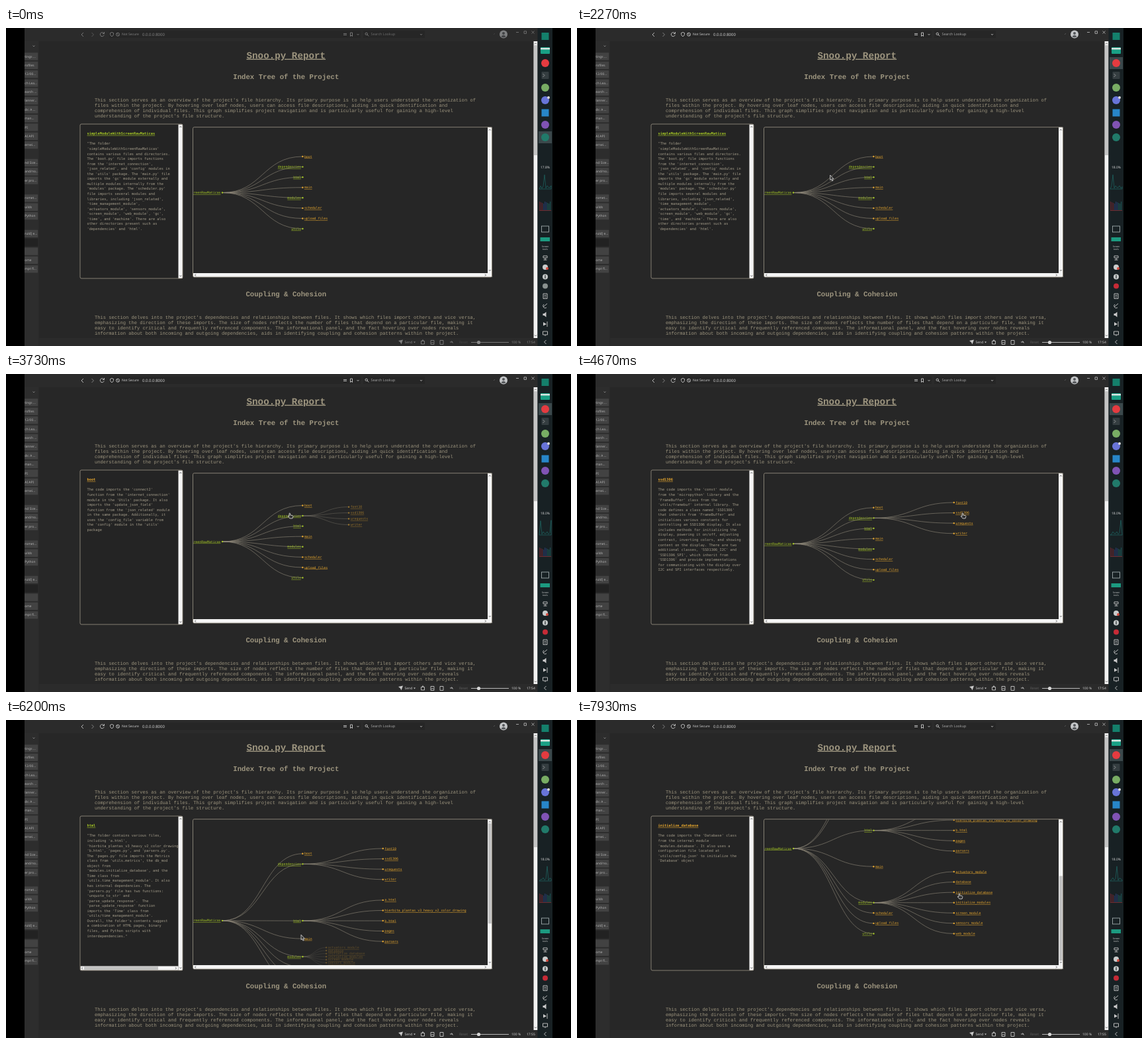
These frames come from a looping animation (854 px wide and 480 px high, 8 s). An HTML page:

```html
<!DOCTYPE html>
<html lang="en">
<head>
<meta charset="utf-8">
<title>Project report</title>
<style>
html, body { margin: 0; width: 100%; height: 100%; overflow: hidden; background: #000; }
svg { display: block; width: 854px; height: 480px; text-rendering: geometricPrecision; }
text { white-space: pre; }
.page { font-family: "Liberation Mono", monospace; fill: #9d957f; }
.code { font-family: "DejaVu Sans Mono", monospace; }
.ui { font-family: "Noto Sans", sans-serif; fill: #d0d0d0; }
.under { text-decoration: underline; }
.bold { font-weight: bold; }
.line { fill: none; stroke: #c8c8c8; stroke-width: .9; }
.solid { fill: #c8c8c8; stroke: none; }
.tick { fill: none; stroke: #555; stroke-width: .9; }
</style>
</head>
<body>
<svg id="stage" viewBox="0 0 854 480">
  <defs>
    <clipPath id="treeClip"><rect x="283" y="150.5" width="445" height="219.5"/></clipPath>
    <clipPath id="panelClip"><rect x="112" y="145" width="148.5" height="233"/></clipPath>
    <clipPath id="tabClip"><rect x="28" y="20" width="20.5" height="448"/></clipPath>
  </defs>
</svg>
<script>
const LOOP = 8000, ROW = 15.58, TOP = 194, COL = 121.4, ROOT_X = 327;
const FOLDER = '#a4c625', FILE = '#e5a62e';
const stage = document.getElementById('stage');

const set = (node, attrs) => { for (const key in attrs) node.setAttribute(key, attrs[key]); };
function el(tag, attrs, parent = stage) {
  const node = document.createElementNS('http://www.w3.org/2000/svg', tag);
  set(node, attrs);
  return parent.appendChild(node);
}
const group = (attrs = {}, parent = stage) => el('g', attrs, parent);
const rect = (x, y, width, height, fill, parent, more) => el('rect', { x, y, width, height, fill, ...more }, parent);
const disc = (cx, cy, r, fill, parent) => el('circle', { cx, cy, r, fill }, parent);
const path = (d, parent, more) => el('path', { d, class: 'line', ...more }, parent);
// y is the middle of the line of text
function text(x, y, string, size, cls, parent, more) {
  const node = el('text', { x, y: y + size * .32, 'font-size': size, class: cls, ...more }, parent);
  node.textContent = string;
  return node;
}
const lines = (x, y, step, string, size, cls, parent, more) =>
  string.trim().split('\n').forEach((s, i) => text(x, y + i * step, s, size, cls, parent, more));
const mix = (a, b, p) => a + (b - a) * p;
const ease = v => { v = Math.max(0, Math.min(1, v)); return v * v * (3 - 2 * v); };
const middle = { 'text-anchor': 'middle' }, solid = { class: 'solid' }, tick = { class: 'tick' };

// Window background and page
rect(28, 0, 798, 480, '#272727');
rect(28, 0, 776, 20, '#2b2b2b');
rect(156, 4, 380, 11, '#262626');
rect(540, 4, 93, 11, '#262626');
rect(28, 20, 21.5, 460, '#2d2d2d');
rect(49.5, 468, 754, 12, '#2b2b2b');

text(423.3, 41, 'Snoo.py Report', 14.24, 'page bold under', stage, middle);
text(423.3, 74, 'Index Tree of the Project', 10.68, 'page bold', stage, middle);
text(423.3, 402, 'Coupling & Cohesion', 10.68, 'page bold', stage, middle);
lines(134, 109, 8, `
This section serves as an overview of the project's file hierarchy. Its primary purpose is to help users understand the organization of
files within the project. By hovering over leaf nodes, users can access file descriptions, aiding in quick identification and
comprehension of individual files. This graph simplifies project navigation and is particularly useful for gaining a high-level
understanding of the project's file structure.`, 7.115, 'page');
lines(134, 437, 8, `
This section delves into the project's dependencies and relationships between files. It shows which files import others and vice versa,
emphasizing the direction of these imports. The size of nodes reflects the number of files that depend on a particular file, making it
easy to identify critical and frequently referenced components. The informational panel, and the fact hovering over nodes reveals
information about both incoming and outgoing dependencies, aids in identifying coupling and cohesion patterns within the project.`, 7.115, 'page');

// Tabs
const tabs = group({ 'clip-path': 'url(#tabClip)' });
const tabNames = ['tings ...', 'rofiles', '12/00...', 'ch Lea...', 'earch ...', 'lanner...', 'ds: A ...', 'man...', 'PI', 'AI API', 'ernei...', '',
  'nd Size...', 'and/no...', 'er pro...', '', 'romet...', 'uilds', 'Python', '', 'ruld] e...', '', '', 'ome', 'mpt fl...'];
tabNames.forEach((name, i) => {
  const y = 43 + i * 13.37;
  if (i === 21) return rect(28, y - 6, 21, 12, '#222', tabs);
  if (i !== 11 && i !== 15 && i !== 19) rect(26, y - 5.7, 22.5, 11.3, '#424242', tabs, { rx: 1 });
  text(28.3, y, name, 4.9, 'ui', tabs, { opacity: .8 });
});
path('M40.5 26.5l1.5 1.5l1.5-1.5', stage, { opacity: .6 });

// Browser controls, dimmed while the window has no focus
const chrome = group();
path('M117 7l-3 3l3 3', chrome);
path('M129.5 7l3 3l-3 3', chrome, { opacity: .6 });
path('M147.8 8a3 3 0 1 0 .4 2.5M148.5 6v2.5h-2.5', chrome);
path('M160 6.5l2.5 1v2q0 2-2.5 3.3q-2.5-1.3-2.5-3.3v-2z', chrome);
path('M166.5 9.7a2.5 2.5 0 1 0 5 0a2.5 2.5 0 1 0-5 0M167.3 8l3.4 3.4', chrome);
text(175, 9.7, 'Not Secure', 5, 'ui', chrome);
text(206, 9.7, '0.0.0.0:8000', 6, 'ui', chrome);
path('M510 8.5h5M510 10.5h5M520.5 7v5.5l1.5-1.5l1.5 1.5v-5.5zM530.5 9l1.5 1.5l1.5-1.5M626 9l1.5 1.5l1.5-1.5', chrome);
path('M543 8.8a1.7 1.7 0 1 0 3.4 0a1.7 1.7 0 1 0-3.4 0M546 10l2.3 2.3', chrome);
text(551.5, 9.7, 'Search Lookup', 5.3, 'ui', chrome, { opacity: .75 });
path('M737 10l2-2', chrome, { opacity: .3 });
disc(752, 9.5, 6, '#c4c6c8', chrome);
disc(752, 8, 2, '#55585b', chrome);
path('M748.3 13q3.7-4.5 7.4 0q-3.7 2.5-7.4 0', chrome, { class: '', fill: '#55585b' });
path('M771 6.5h4M783 4.8h3.5v3.5h-3.5zM794.5 4.5l4 4M798.5 4.5l-4 4', chrome, { opacity: .85 });
path('M593 472l7-1.5l-2.5 7l-1.5-3z', chrome, solid);
text(602.5, 474.3, 'Send', 5, 'ui', chrome);
path('M616 473.5h3l-1.5 2z', chrome, solid);
path('M627.5 472.5h5v4.500h-5zM629 472l1-1.5l1 1.5M642 471.5h5v6h-5zM642.5 476l2-2l2 2M656 471.5h5v6h-5zM671 474h4M673.5 472.5l2 3', chrome);
text(685, 474.3, 'Reset', 5, 'ui', chrome, { opacity: .3 });
path('M703 474.5h57', chrome);
disc(714.5, 474.5, 2.6, '#d8d8d8', chrome);
text(764, 474.3, '100 %', 5, 'ui', chrome);
const clock = text(787, 474.3, '', 5, 'ui', chrome);

// Page scrollbar
rect(797.5, 20, 6, 448, '#f2f2f2');
rect(798, 26, 5, 166, '#c4c4c4');
path('M799 24.3l1.5-1.5l1.5 1.5M799 463.5l1.5 1.5l1.5-1.5', stage, tick);

// Desktop dock
rect(803.5, 0, 22.5, 480, '#182124');
rect(809.5, 7, 11, 11, '#14806c');
rect(808, 29, 14, 10, '#19a085', stage, { rx: 1 });
rect(808, 30, 14, 2.5, '#d8e4e0');
const focusBox = rect(805, 0, 20, 18, '#3b484b');
rect(809.5, 66, 11, 11, '#343d40', stage, { rx: 1 });
path('M811.5 69l2.5 2.5l-2.5 2.5', stage, { opacity: .7 });
[[53, '#e43b40'], [90, '#78ad64'], [109, '#6874d8'], [146, '#8053b4'], [165, '#217a6a']].forEach(([y, fill]) => disc(815, y, 6, fill));
rect(809.5, 122.5, 11, 11, '#2786c9');
disc(820, 105, 2, '#d9d9d9');
const load = text(815, 210, '', 5, 'ui', stage, middle);
const graph = path('', stage, { style: 'stroke:#1f7570;stroke-width:.6' });
for (let i = 0; i < 9; i++)
  rect(806 + i * 2, 262 + (i * 5 % 4), 1.2, 13 - (i * 5 % 4), ['#5c252d', '#253761', '#1b4f4f'][Math.floor(i / 3)]);
rect(806, 275, 18, 1, '#6e2c30');
rect(809.5, 299, 11, 9, 'none', stage, { stroke: '#aeb9ba', 'stroke-width': .8 });
rect(807.5, 316, 14.5, 6, '#1c9a80');
text(815, 329.5, 'Screen', 3.4, 'ui', stage, middle);
text(815, 333.5, 'tools', 3.4, 'ui', stage, middle);
path('M812 344h6v3h-6zM815 347v3M812.5 350h5');
disc(815, 361, 4, '#c9cccc');
disc(818, 363, 2, '#d54a3d');
disc(815, 375.5, 4, '#c4c8c8');
rect(814.4, 373, 1.2, 5, '#263033');
const tray = disc(815, 389.5, 4, '');
path('M812 401h6v7.5h-6zM813.5 403.5h3M813.5 406h3M812 421l6-5M813 417a3 3 0 0 0 4 5M818 443v8M811.5 458h7v5h-7zM815 463v2M816.5 471l-3 3l3 3');
path('M811.5 431h2l3-2.5v8l-3-2.5h-2zM812 444v5.5l5-2.5z', stage, solid);

// Description panel
rect(112, 145, 155, 233, '#242424', stage, { rx: 2 });
const panelArea = group({ 'clip-path': 'url(#panelClip)' });
const panelData = [
[0, 'simpleModuleWithScreenRawMaticas', FOLDER, `
"The folder
'simpleModuleWithScreenRawMaticas'
contains various files and directories.
The 'boot.py' file imports functions
from the 'internet_connection',
'json_related', and 'config' modules in
the 'utils' package. The 'main.py' file
imports the 'gc' module externally and
multiple modules internally from the
'modules' package. The 'scheduler.py'
file imports several modules and
libraries, including 'json_related',
'time_management_module',
'actuators_module', 'sensors_module',
'screen_module', 'web_module', 'gc',
'time', and 'machine'. There are also
other directories present such as
'dependencies' and 'html'.`],
[2600, 'boot', FILE, `
The code imports the 'connect2'
function from the 'internet_connection'
module in the 'Utils' package. It also
imports the 'update_json_field'
function from the 'json_related' module
in the same package. Additionally, it
uses the 'config_file' variable from
the 'config' module in the 'utils'
package`],
[4400, 'ssd1306', FILE, `
The code imports the 'const' module
from the 'micropython' library and the
'FrameBuffer' class from the
'utils/framebuf' internal library. The
code defines a class named 'SSD1306'
that inherits from 'FrameBuffer' and
initializes various constants for
controlling an SSD1306 display. It also
includes methods for initializing the
display, powering it on/off, adjusting
contrast, inverting colors, and showing
content on the display. There are two
additional classes, 'SSD1306_I2C' and
'SSD1306_SPI', which inherit from
'SSD1306' and provide implementations
for communicating with the display over
I2C and SPI interfaces respectively.`],
[5050, 'html', FOLDER, `
"The folder contains various files,
including 'a.html',
'hierbita_plantas_v3_heavy_v2_color_drawing
'b.html', 'pages.py', and 'parsers.py'.
The 'pages.py' file imports the Metrics
class from 'utils.metrics', the db_mod
object from
'modules.initialize_database', and the
Time class from
'utils.time_management_module'. It also
has internal dependencies. The
'parsers.py' file has two functions:
'unquote_to_str' and
'parse_update_response'.  The
'parse_update_response' function
imports the 'Time' class from
'utils/time_management_module'.
Overall, the folder's contents suggest
a combination of HTML pages, binary
files, and Python scripts with
interdependencies."`],
[6300, 'main', FILE, `
The code imports the 'gc' module
internally and the 'schedules' module
externally. It also imports the
'initialize_modules',
'actuators_module', 'sensors_module',
'screen_module', and 'web_module'
modules internally from the 'modules'
package.`],
[7600, 'initialize_database', FILE, `
The code imports the 'Database' class
from the internal module
'modules.database'. It also uses a
configuration file located at
'utils/config.json' to initialize the
'Database' object`]];
const panels = panelData.map(([start, title, fill, body]) => {
  const node = group({}, panelArea);
  text(122.5, 159.7, title, 5.337, 'code bold under', node, { fill });
  lines(122.5, 174.7, 7.56, body, 5.337, 'code', node, { fill: '#a29b89' });
  return { start, title, node };
});
rect(260.5, 145.5, 6.5, 232.5, '#f4f4f4');
path('M262.3 150l1.5-1.5l1.5 1.5M262.3 373.5l1.5 1.5l1.5-1.5', stage, tick);
const panelBar = group();
rect(112.5, 371.5, 148, 6.3, '#f4f4f4', panelBar);
rect(118, 372.2, 112, 5, '#c1c1c1', panelBar);
path('M116 373.2l-1.5 1.5l1.5 1.5M256 373.2l1.5 1.5l-1.5 1.5', panelBar, tick);
const border = { rx: 2, stroke: '#8f8a7c', 'stroke-width': .9 };
rect(112, 145, 155, 233, 'none', stage, border);

// Tree: each layout gives the row of every first-level node
const items = ['boot', 'dependencies', 'html', 'main', 'modules', 'scheduler', 'upload_files', 'utils'];
const children = {
  dependencies: ['font10', 'ssd1306', 'urequests', 'writer'],
  html: ['a.html', 'hierbita_plantas_v3_heavy_v2_color_drawing', 'b.html', 'pages', 'parsers'],
  modules: ['actuators_module', 'database', 'initialize_database', 'initialize_modules', 'screen_module', 'sensors_module', 'web_module']
};
const opened = { dependencies: 1, html: 2, modules: 3 };
const layouts = [
  [0, 1, 2, 3, 4, 5, 6, 7],
  [.5, 1.5, 2.5, 3.5, 4.5, 5.5, 6.5, 7.5],
  [.5, 1.5, 7, 8, 9, 10, 11, 12],
  [.5, 1.5, 7, 10.5, 14, 15, 16, 17]
];
const clicks = [3500, 5120, 6050], GROW = 420, MAX_SCROLL = 136.4;

rect(282.5, 149.7, 452, 226.3, '#262626');
const tree = group({ 'clip-path': 'url(#treeClip)' });
const canvas = group({}, tree);
const links = group({}, canvas);

function makeNode(name, folder) {
  const link = path('', links, { style: 'stroke:#918a7b;stroke-width:.6' });
  const node = group({}, canvas);
  const fill = folder ? FOLDER : FILE;
  disc(0, 0, 1.2, fill, node);
  text(folder ? -2.5 : 2.5, 0, name, 4.89, 'code under', node, { fill, 'text-anchor': folder ? 'end' : 'start' });
  return { link, node };
}
function placeNode({ link, node }, x, y, fromX, fromY, opacity = 1) {
  const mid = (x + fromX) / 2;
  set(link, { d: `M${fromX} ${fromY}C${mid} ${fromY} ${mid} ${y} ${x} ${y}`, opacity });
  set(node, { transform: `translate(${x} ${y})`, opacity });
}
const root = makeNode('simpleModuleWithScreenRawMaticas', true);
const nodes = items.map(name => ({
  name,
  view: makeNode(name, name in children || name === 'utils'),
  kids: (children[name] || []).map(kid => makeNode(kid, false))
}));

rect(728, 149.7, 6.5, 226.3, '#f4f4f4');
rect(283, 370, 445, 6, '#f4f4f4');
const thumb = rect(728.8, 156, 5, 0, '#c1c1c1');
path('M729.8 154.5l1.5-1.5l1.5 1.5M729.8 365l1.5 1.5l1.5-1.5M287 371.5l-1.5 1.5l1.5 1.5M724 371.5l1.5 1.5l-1.5 1.5', stage, tick);
rect(282.5, 149.7, 452, 226.3, 'none', stage, border);

function drawTree(t) {
  const step = clicks.filter(c => t >= c).length;
  const grow = step ? ease((t - clicks[step - 1]) / GROW) : 1;
  const before = layouts[Math.max(0, step - 1)], after = layouts[step];
  const rows = items.map((_, i) => TOP + ROW * mix(before[i], after[i], grow));
  const rootY = (rows[0] + rows[7]) / 2;
  const x1 = ROOT_X + COL;
  placeNode(root, ROOT_X, rootY, ROOT_X, rootY);
  nodes.forEach(({ name, view, kids }, i) => {
    const y = rows[i];
    placeNode(view, x1, y, ROOT_X, rootY);
    const open = step > opened[name] ? 1 : step === opened[name] ? grow : 0;
    kids.forEach((kid, k) =>
      placeNode(kid, x1 + COL * open, y + ROW * (k - (kids.length - 1) / 2) * open, x1, y, open));
  });
  const scroll = MAX_SCROLL * ease((t - 6230) / 230);
  set(canvas, { transform: `translate(0 ${-scroll})` });
  const content = rows[7] + 46.5 - 150, view = 219.5, track = 207;
  set(thumb, { y: 156 + track * scroll / content, height: content > view ? track * view / content : 0 });
}

// Pointer: time, x, y
const route = [[700, 520, 476], [1300, 314, 253], [1950, 314, 253], [2600, 459, 199], [3000, 459, 199], [3350, 430, 214],
  [3750, 430, 214], [4400, 584, 214], [4750, 584, 214], [5050, 440, 238], [5220, 440, 238], [5580, 517.5, 313.5],
  [5720, 517.5, 313.5], [6000, 436, 338], [6120, 436, 338], [6480, 533, 266], [7050, 533, 266], [7650, 579, 266], [8000, 579, 266]];
const hovers = [[1250, 2000], [2550, 3050], [3280, 3800], [4330, 4800], [5000, 5200], [5950, 6120], [7550, 8000]];
const pointer = group();
const shape = { fill: '#303030', stroke: '#e2e2e2', 'stroke-width': .8, class: '' };
const arrow = path('M-2.5-4.5V3L-.8 1.6L.4 4.4L1.8 3.8L.6 1.2H2.8z', pointer, shape);
const hand = path('M-2 1V-3.5Q-1.2-4.5-.4-3.5V-1L3-.5Q4 0 3.8 1.5L3 4H-1L-3.8.8Q-3-.4-2 1z', pointer, shape);
const show = (node, visible) => { node.style.display = visible ? '' : 'none'; };

function drawPointer(t) {
  show(pointer, t >= route[0][0]);
  const next = Math.max(1, route.findIndex(stop => stop[0] > t));
  const a = route[next - 1], b = route[next];
  const p = ease((t - a[0]) / (b[0] - a[0]));
  set(pointer, { transform: `translate(${mix(a[1], b[1], p)} ${mix(a[2], b[2], p)})` });
  const over = hovers.some(([from, to]) => t >= from && t < to);
  show(hand, over);
  show(arrow, !over);
}

function drawMeters(t) {
  const focused = t >= 1800, second = Math.floor(t / 1000);
  set(chrome, { opacity: focused ? 1 : .55 });
  set(focusBox, { y: focused ? 44 : 156 });
  set(tray, { fill: t < 1000 ? '#89918f' : '#c62b36' });
  load.textContent = t < 1000 ? '17.8%' : '18.0%';
  clock.textContent = t < 5400 ? '17:54' : '17:55';
  let d = 'M806 243';
  for (let i = 1; i < 10; i++) {
    const k = i + second;
    d += `L${806 + i * 2} ${240 - 2 * Math.sin(k * 2.3) - (k % 8 === 4 ? 18 : 0)}`;
  }
  set(graph, { d: d + 'V243z' });
}

function draw() {
  const t = performance.now() % LOOP;
  const active = panels.filter(panel => t >= panel.start).pop();
  panels.forEach(panel => show(panel.node, panel === active));
  show(panelBar, active.title === 'html');
  drawTree(t);
  drawPointer(t);
  drawMeters(t);
  requestAnimationFrame(draw);
}
draw();
</script>
</body>
</html>
```
